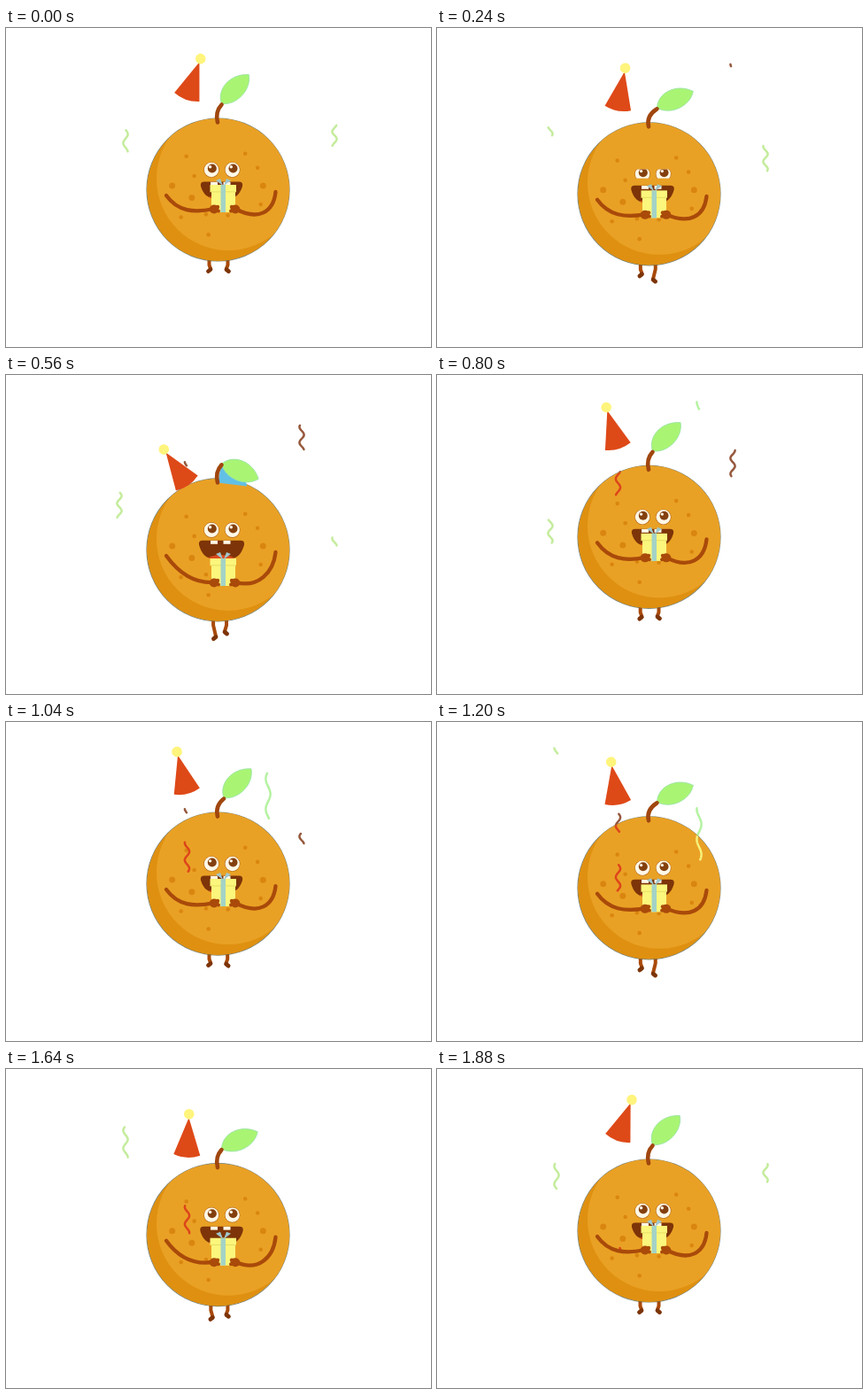
Animation, 480 px wide and 360 px high, one loop 1920 ms. Source, as an HTML page with a canvas:

```html
<!DOCTYPE html>
<html lang="en">
<head>
<meta charset="utf-8">
<title>Party orange</title>
<style>
html, body { margin: 0; width: 100%; height: 100%; overflow: hidden; background: #fff; }
canvas { display: block; }
</style>
</head>
<body>
<canvas id="stage" width="480" height="360"></canvas>
<script>
const ctx = document.getElementById('stage').getContext('2d');
const LOOP = 1920, HOP = LOOP / 2, TAU = 2 * Math.PI;
const R = 80.5, X = 239.5;
const BROWN = '#a94a0a', DARK = '#7d3408', CREAM = '#fff8e6', YELLOW = '#fbf67c', RIBBON = '#a3d3c6';
const PALE = '#c4ec9c', RED = '#dd451a', RUST = '#96583c';

// Each streamer draws itself down a wavy path of given top and length, then follows with its tail.
const STREAMERS = [
  { x: 371, top: 100, length: 93, start: 1650, color: PALE },
  { x: 135, top: 29, length: 111, start: 1150, color: PALE },
  { x: 128, top: 111, length: 93, start: 150, color: PALE },
  { x: 334, top: 41, length: 97, start: 220, color: RUST },
  { x: 204.5, top: 98, length: 106, start: 530, color: RUST, inside: RED },
  { x: 204.5, top: 98, length: 106, start: 1010, color: RUST, inside: RED },
  { x: 296, top: 30, length: 188, start: 770, life: 740, color: '#b4f2a0', inside: '#f7f07a' }
];

// Rises to 1 at the peak time of every hop; a higher power gives a longer rest at 0.
const pulse = (t, peak, power) => ((1 + Math.cos((t - peak) / HOP * TAU)) / 2) ** power;

function fill(path, color) { ctx.fillStyle = color; ctx.fill(new Path2D(path)); }
function line(path, color, width) {
  ctx.strokeStyle = color;
  ctx.lineWidth = width;
  ctx.stroke(new Path2D(path));
}
function dot(x, y, r, color, ry = r) {
  ctx.fillStyle = color;
  ctx.beginPath();
  ctx.ellipse(x, y, r, ry, 0, 0, TAU);
  ctx.fill();
}
function box(x, y, w, h, color) { ctx.fillStyle = color; ctx.fillRect(x, y, w, h); }
function within(x, y, degrees, draw) {
  ctx.save();
  ctx.translate(x, y);
  ctx.rotate(degrees * TAU / 360);
  draw();
  ctx.restore();
}

function streamers(t, layer) {
  for (const s of STREAMERS) {
    const u = ((t - s.start + LOOP) % LOOP) / (s.life || 880);
    if (u > 1 || !s[layer]) continue;
    const head = s.length * Math.min(1, 1.15 * u), tail = s.length * u ** 1.9;
    ctx.beginPath();
    for (let y = tail; y <= head; y++) {
      ctx.lineTo(s.x - 2.6 * Math.cos(y / s.length * 5.5 * TAU), s.top + y);
    }
    ctx.strokeStyle = s[layer];
    ctx.lineWidth = 2.5;
    ctx.stroke();
  }
}

function leg(cy, side, stretch) {
  const hip = 240 + side * (10.5 - 5 * stretch), ankle = 240 + side * (9 - 6.5 * stretch);
  const y = cy + 89 + 9 * stretch;
  line(`M${hip},${cy + 76} L${hip},${cy + 85} L${ankle},${y}`, BROWN, 4);
  line(`M${ankle},${y + 1} l${side * 2.5},2`, DARK, 4.8);
}

function spots(cy, radius, first, step) {
  for (let i = 0; i < 4; i++) {
    const a = (first + i * step) * TAU / 360;
    dot(X + radius * Math.cos(a), cy + radius * Math.sin(a), i === 2 ? 3.5 : 2.3, '#d98610');
  }
}

function body(t, cy) {
  ctx.save();
  ctx.beginPath();
  ctx.arc(X, cy, R, 0, TAU);
  ctx.strokeStyle = 'rgba(90,100,85,.8)';
  ctx.lineWidth = 1.2;
  ctx.stroke();
  ctx.clip();
  dot(X, cy, R, '#df9010');
  dot(251, cy - 12.5, 81, '#e9a125');
  spots(cy, 31, 69, 47);
  spots(cy, 52, 102, 41.5);
  spots(cy, 51, -53, 24);
  streamers(t, 'inside');
  ctx.restore();
}

function eye(x, y, open) {
  ctx.save();
  ctx.beginPath();
  ctx.rect(x - 10, y - 10 * open, 20, 19 * open);
  ctx.clip();
  dot(x, y, 8.8, '#b5691a');
  dot(x, y, 8.2, CREAM);
  dot(x + 0.8, y - 1.5, 5, '#84400f');
  dot(x - 1.4, y - 3.2, 1.7, CREAM);
  ctx.restore();
}

function mouth(y, drop) {
  const w = 23.5 + drop * 0.13, top = y - 9 - drop * 0.11, bottom = y + 9.5;
  const l = 243.5 - w, r = 243.5 + w;
  const shape = `M${l + 4},${top} H${r - 4} Q${r + 1},${top} ${r},${top + 5}
    Q${r - 4},${bottom} ${r - 15},${bottom} H${l + 15} Q${l + 4},${bottom} ${l},${top + 5} Q${l - 1},${top} ${l + 4},${top}Z`;
  ctx.save();
  fill(shape, DARK);
  ctx.clip(new Path2D(shape));
  dot(243, bottom + 2, 16, '#dc4c1e', 6);
  box(231, top, 8, 4, CREAM);
  box(245.5, top, 8, 4, CREAM);
  ctx.restore();
}

function gift(y) {
  fill(`M245,${y + 1} L237,${y - 5} L242,${y - 7}Z M246,${y + 1} L249,${y - 7} L254,${y - 5}Z`, '#9fc6cc');
  box(232, y + 7, 27, 24, YELLOW);
  box(230.5, y, 29.5, 8, YELLOW);
  box(230.5, y + 7.5, 29.5, 0.8, '#e3d860');
  box(242.5, y, 5.5, 31, RIBBON);
}

function arms(cy, hand, drop) {
  const l = cy + 6.5, r = cy + 2.5;
  line(`M181,${l} C194,${l + 18} 212,${hand + 5 - drop * 0.25} 235,${hand}`, BROWN, 4.3);
  line(`M304.5,${r} C302,${r + 23} 285,${hand + 14 - drop * 0.5} 259,${hand}`, BROWN, 4.3);
  for (const side of [-1, 1]) {
    const x = 247 + side * 12;
    dot(x, hand + 0.5, 5.3, BROWN, 5);
    dot(x - side * 4, hand - 2, 2.2, BROWN);
    dot(x - side * 5, hand + 2.5, 2, BROWN);
  }
}

function leaf(x, y, angle, cy) {
  if (angle > 0) fill(`M239,${cy - 76} L${x},${y} L270,${y + 14} L272,${cy - 72}Z`, '#62c0e6');
  within(x, y, angle, () => {
    const shape = 'M0,0 C7,-15 31,-17 45,0 C35,14 10,14 0,0Z';
    fill(shape, '#a9f573');
    line(shape, '#9be2a8', 0.8);
  });
  line(`M239,${cy - 76} Q236,${cy - 88} ${x},${y + 1}`, '#a0460e', 4.6);
}

function hat(y, tilt) {
  within(204.3, y, tilt, () => {
    fill('M0,-42 L15,0 Q0,6 -15,0Z', '#de4918');
    dot(0, -46, 5.8, '#fff47c');
  });
}

function draw(t) {
  const fall = pulse(t, 460, 2.5), drop = 19.7 * fall, cy = 182.5 + drop;
  const giftY = 177 + 30 * Math.min(1, 1.2 * pulse(t, 490, 2.3));
  const hatY = Math.min(cy - 72.5, 78 + 51.5 * pulse(t, 478, 2.1));
  const tilt = 2 + 18 * Math.cos((t + 60) / LOOP * TAU) - 30 * pulse(t, 520, 3);
  const stemX = 243.5 + 5 * Math.max(0, Math.sin(t / HOP * TAU));
  const open = Math.min(1, Math.max(0.08, Math.abs(t - 300) / 110));

  ctx.lineCap = ctx.lineJoin = 'round';
  ctx.clearRect(0, 0, 480, 360);
  streamers(t, 'color');
  leg(cy, -1, pulse(t, 510, 3));
  leg(cy, 1, Math.min(1, 1.2 * pulse(t, 360, 3)));
  body(t, cy);
  ctx.save();
  ctx.globalCompositeOperation = 'source-over';
  leaf(stemX, cy - 97, -47 + 76 * Math.min(1, 1.2 * fall), cy);
  ctx.restore();
  hat(hatY, tilt);
  eye(232, cy - 22.5, open);
  eye(255.7, cy - 22.5, open);
  mouth(cy, drop);
  gift(giftY);
  arms(cy, giftY + 27, drop);
}

function tick() {
  draw(performance.now() % LOOP);
  requestAnimationFrame(tick);
}
tick();
</script>
</body>
</html>
```
